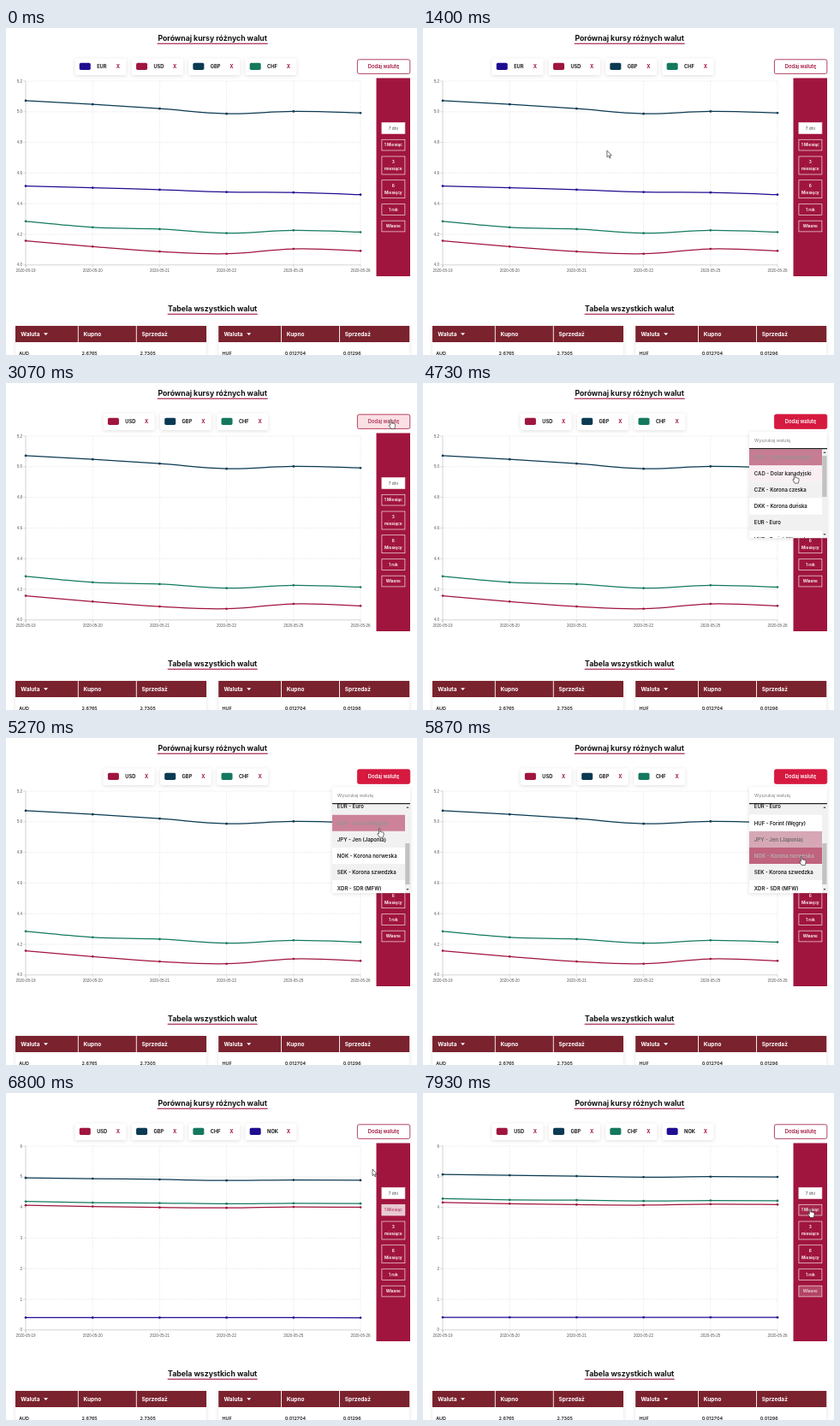
These frames come from a looping animation (480x382 px, 8000 ms). An HTML page:

```html
<!DOCTYPE html>
<html lang="pl">
<head>
<meta charset="utf-8">
<title>Kursy walut</title>
<style>
  html, body { margin: 0; width: 100%; height: 100%; overflow: hidden; background: #fff; }
  svg { display: block; width: 100vw; height: 100vh; }
  text { font-family: Inter, "Open Sans", sans-serif; white-space: pre; }
  .axis text { font-family: "Liberation Sans", Arial, sans-serif; }
  .raised { filter: drop-shadow(0 1px 2px rgba(0, 0, 0, .13)); }
</style>
</head>
<body>
<svg id="stage" viewBox="0 0 480 382">
  <defs><clipPath id="listClip"><rect x="381" y="77" width="91" height="104"/></clipPath></defs>
</svg>
<script>
const LOOP = 8000, FADE = 300;
const REMOVED = 2130, OPENED = 3430, ADDED = 6185;
const RED = '#a0153e', INK = '#1c1c1c', HEAD = '#7a222e';
const stage = document.getElementById('stage');

// Drawing helpers
function el(parent, tag, attrs = {}) {
  const node = document.createElementNS('http://www.w3.org/2000/svg', tag);
  set(node, attrs);
  return parent.appendChild(node);
}
function set(node, attrs) {
  for (const key in attrs) node.setAttribute(key, attrs[key]);
}
const group = (parent, attrs) => el(parent, 'g', attrs);
const rect = (parent, x, y, width, height, fill, more) =>
  el(parent, 'rect', { x, y, width, height, fill, ...more });
const line = (parent, x1, y1, x2, y2, stroke, more) =>
  el(parent, 'line', { x1, y1, x2, y2, stroke, 'stroke-width': .6, ...more });
function label(parent, x, y, str, size, weight, fill, anchor = 'start') {
  const node = el(parent, 'text', { x, y, fill, 'font-size': size, 'font-weight': weight, 'text-anchor': anchor });
  node.textContent = str;
  return node;
}

// Timing helpers
const clamp = v => Math.min(1, Math.max(0, v));
const smooth = u => u * u * (3 - 2 * u);
const mix = (from, to, a) => `color-mix(in srgb, ${to} ${(a * 100).toFixed(1)}%, ${from})`;
const isOpen = t => t >= OPENED && t < ADDED;
const scrollAt = t => 83 * smooth(clamp((t - 4850) / 350));

const path = [
  [400, 476, 386], [900, 405, 312], [1500, 200, 130], [1900, 130, 44], [2190, 130, 44],
  [2400, 284, 57], [2650, 300, 62], [2980, 445, 62], [3070, 449.5, 43], [4450, 449.5, 43],
  [4540, 440, 80], [4690, 435, 93.5], [4730, 434, 106.5], [5250, 436, 105], [5400, 438, 116],
  [5600, 441, 126], [5870, 442, 138], [6700, 443, 139], [6790, 428, 89], [6900, 428, 89],
  [7150, 452, 116], [7450, 452, 231], [7650, 453, 231], [7800, 453, 203], [7930, 452, 135]
];
function pointer(t) {
  const i = path.findIndex(p => p[0] > t);
  if (i === 0) return [path[0][1], path[0][2]];
  if (i < 0) return path[path.length - 1].slice(1);
  const [t0, x0, y0] = path[i - 1], [t1, x1, y1] = path[i];
  const u = smooth((t - t0) / (t1 - t0));
  return [x0 + (x1 - x0) * u, y0 + (y1 - y0) * u];
}
function inside(t, x, y, w, h) {
  const [px, py] = pointer(t);
  return px >= x && px < x + w && py >= y && py < y + h;
}
// Level of a linear hover transition at time t
function fade(t, active) {
  let a = 0;
  for (let s = Math.max(0, t - 2 * FADE); s < t; s += 10)
    a = clamp(a + (active(s) ? 10 : -10) / FADE);
  return a;
}

// Headings
function heading(y, str, width) {
  label(stage, 241.2, y, str, 8.7, 700, '#111', 'middle');
  rect(stage, 241.2 - width / 2, y + 2.4, width, 1.1, RED);
}
heading(15.3, 'Porównaj kursy różnych walut', 129);
heading(331.3, 'Tabela wszystkich walut', 105);

// Chart
const LEFT = 23, TOP = 62, BOTTOM = 276.8, STEP = 78.2, ROW = (BOTTOM - TOP) / 6;
const rates = {
  EUR: { color: '#1f0d91', data: [4.515, 4.504, 4.491, 4.476, 4.473, 4.459] },
  USD: { color: RED, data: [4.158, 4.12, 4.088, 4.073, 4.105, 4.092] },
  GBP: { color: '#0b3a53', data: [5.072, 5.048, 5.02, 4.987, 5.002, 4.992] },
  CHF: { color: '#14795f', data: [4.285, 4.246, 4.234, 4.208, 4.226, 4.214] },
  NOK: { color: '#1f0d91', data: [.412, .411, .411, .41, .41, .408] }
};
const axis = group(stage, { class: 'axis' });
const dates = [19, 20, 21, 22, 25, 26];
const dashed = { 'stroke-dasharray': '1.6 1.2' };
dates.forEach((day, i) => {
  const x = LEFT + STEP * i;
  if (i) line(axis, x, TOP, x, BOTTOM, '#dedede', dashed);
  line(axis, x, BOTTOM, x, BOTTOM + 3, '#c4c4c4');
  label(axis, x, 285.2, '2020-05-' + day, 4.5, 400, '#555', 'middle');
});
const tickLabels = [];
for (let i = 0; i <= 6; i++) {
  const y = BOTTOM - ROW * i;
  if (i) line(axis, LEFT, y, LEFT + STEP * 5, y, '#dedede', dashed);
  line(axis, LEFT - 3, y, LEFT, y, '#c4c4c4');
  tickLabels.push(label(axis, 19, y + 1.6, '', 4.5, 400, '#555', 'end'));
}
line(axis, LEFT, TOP, LEFT, BOTTOM + 3, '#b8b8b8');
line(axis, LEFT, BOTTOM, LEFT + STEP * 5, BOTTOM, '#b8b8b8');

const plot = group(stage);
for (const code in rates) {
  const r = rates[code];
  r.group = group(plot);
  r.curve = el(r.group, 'path', { fill: 'none', stroke: r.color, 'stroke-width': 1.25 });
  r.dots = r.data.map((_, i) => el(r.group, 'circle', { cx: LEFT + STEP * i, r: 1.35, fill: r.color }));
}
function drawCurve(r, base, top, grow) {
  const pts = r.data.map((v, i) => [LEFT + STEP * i, BOTTOM - (v - base) / (top - base) * (BOTTOM - TOP) * grow]);
  const handle = (i, sign) => {
    const a = pts[Math.max(0, i - 1)], b = pts[Math.min(pts.length - 1, i + 1)];
    return pts[i].map((v, k) => v + sign * .2 * (b[k] - a[k]));
  };
  let d = 'M' + pts[0];
  for (let i = 1; i < pts.length; i++) d += `C${handle(i - 1, 1)} ${handle(i, -1)} ${pts[i]}`;
  set(r.curve, { d });
  r.dots.forEach((dot, i) => set(dot, { cy: pts[i][1] }));
}

// Legend
const PITCH = 66.3, PILL = 60;
for (const code in rates) {
  const g = rates[code].pill = group(stage);
  rect(g, 0, 35.5, PILL, 19.5, '#fff', { rx: 2, class: 'raised' });
  rect(g, 5.2, 40.8, 13, 8.3, rates[code].color, { rx: 1.8 });
  label(g, 25.6, 47.1, code, 5.7, 700, INK);
  label(g, 48.2, 47.1, 'X', 5.8, 700, RED);
}
function codesAt(t) {
  if (t < REMOVED) return ['EUR', 'USD', 'GBP', 'CHF'];
  return t < ADDED ? ['USD', 'GBP', 'CHF'] : ['USD', 'GBP', 'CHF', 'NOK'];
}

// Sidebar
rect(stage, 432.5, 58.5, 39.5, 231.5, RED);
const periods = [
  [110.5, 13, '7 dni'], [130.3, 12.7, '1 Miesiąc'], [150, 21, '3', 'miesiące'],
  [177.7, 21, '6', 'Miesięcy'], [205.7, 12.7, '1 rok'], [225.2, 12.7, 'Własne']
].map(([y, h, ...lines], i) => {
  const box = rect(stage, 438.9, y, 27, h, '#fff', { stroke: '#f3dfe5', 'stroke-width': .7 });
  const first = y + h / 2 + 1.7 - (lines.length - 1) * 4;
  const texts = lines.map((s, k) => label(stage, 452.3, first + k * 8, s, 4.8, i ? 600 : 400, '#444', 'middle'));
  return { y, h, box, texts };
});

// Tables
function table(x, cells) {
  rect(stage, x, 348, 223, 50, '#fff', { class: 'raised' });
  rect(stage, x, 348, 223, 19, HEAD);
  const columns = [0, 73.3, 141.3];
  ['Waluta', 'Kupno', 'Sprzedaż'].forEach((name, i) => {
    if (i) line(stage, x + columns[i], 348, x + columns[i], 367, '#fff', { 'stroke-width': .9 });
    label(stage, x + columns[i] + 6.3, 360, name, 6.5, 700, '#fff');
    label(stage, x + columns[i] + 4.2, 382.3, cells[i], 5.4, 600, INK);
  });
  el(stage, 'path', { d: `M${x + 33} 356.2h5l-2.5 2.8z`, fill: '#fff' });
}
table(11, ['AUD', '2.6765', '2.7305']);
table(248.2, ['HUF', '0.012704', '0.01296']);

// Add button
const button = rect(stage, 410.4, 36.8, 61.4, 16.6, '#fff', { rx: 2, 'stroke-width': .8 });
const buttonText = label(stage, 441, 47.1, 'Dodaj walutę', 5.8, 600, RED, 'middle');

// Dropdown
const menu = group(stage);
rect(menu, 381, 57, 91, 124.2, '#fff', { class: 'raised' });
label(menu, 387, 68.8, 'Wyszukaj walutę', 5.3, 400, '#808080');
const ITEM = 19.1, LIST = 77.3;
const list = group(group(menu, { 'clip-path': 'url(#listClip)' }));
const items = [
  'AUD - Dolar australijski', 'CAD - Dolar kanadyjski', 'CZK - Korona czeska', 'DKK - Korona duńska',
  'EUR - Euro', 'HUF - Forint (Węgry)', 'JPY - Jen (Japonia)', 'NOK - Korona norweska',
  'SEK - Korona szwedzka', 'XDR - SDR (MFW)'
].map((name, i) => {
  const y = LIST + ITEM * i;
  return {
    y, plain: i % 2 ? '#ffffff' : '#f1f1f1',
    box: rect(list, 381, y, 85, ITEM, '#fff'),
    text: label(list, 386.8, y + 11.7, name, 6, 600, INK)
  };
});
rect(menu, 466, 77, 6, 104, '#f1f1f1');
const thumb = rect(menu, 466.3, 85, 5.2, 48, '#c1c1c1');
el(menu, 'path', { d: 'M467.3 82l1.7-2 1.7 2zM467.3 176l1.7 2 1.7-2z', fill: '#555' });
line(menu, 381, 76.6, 472, 76.6, '#222', { 'stroke-width': 1.1 });

// Pointer, both shapes with the hot spot at the origin
const outline = { fill: '#fff', stroke: '#222', 'stroke-width': .65, 'stroke-linejoin': 'round' };
const arrow = el(stage, 'path', { d: 'M0 0V7.6L1.8 6 3 8.8 4.2 8.3 3 5.6H5.4Z', ...outline });
const hand = el(stage, 'path', {
  d: 'M-.7 .6Q0-.4.8.6V4.2Q1.6 3.5 2.3 4.3 3.1 3.8 3.7 4.6 4.8 4.3 5 5.4V7.6L4.2 10.6H.2L-2.3 6.6Q-2 5.4-.7 6.4Z',
  ...outline
});

function render(t) {
  const open = isOpen(t), wide = t >= ADDED, codes = codesAt(t);

  const start = wide ? ADDED : REMOVED;
  const grow = t < REMOVED ? 1 : 1 - (1 - clamp((t - start) / 1000)) ** 4;
  tickLabels.forEach((node, i) => node.textContent = wide ? i : (4 + i * .2).toFixed(1));

  const left = 210 - ((codes.length - 1) * PITCH + PILL) / 2;
  for (const code in rates) {
    const r = rates[code], place = codes.indexOf(code);
    const display = place < 0 ? 'none' : 'inline';
    set(r.group, { display });
    set(r.pill, { display, transform: `translate(${left + Math.max(0, place) * PITCH})` });
    if (place >= 0) drawCurve(r, wide ? 0 : 4, wide ? 6 : 5.2, grow);
  }

  const hot = fade(t, s => isOpen(s) || inside(s, 410, 37, 62, 16.5));
  set(button, { fill: mix('#fff', '#d6193f', hot), stroke: mix(RED, '#d6193f', hot) });
  set(buttonText, { fill: mix(RED, '#fff', hot) });

  periods.forEach(({ y, h, box, texts }, i) => {
    const a = i ? fade(t, s => !isOpen(s) && inside(s, 438.5, y, 27.5, h)) : 1;
    set(box, { fill: mix(RED, '#fff', a) });
    if (i) texts.forEach(node => set(node, { fill: mix('#fff', RED, a) }));
  });

  set(menu, { display: open ? 'inline' : 'none' });
  if (open) {
    const scroll = scrollAt(t);
    set(list, { transform: `translate(0 ${-scroll})` });
    set(thumb, { y: 85 + scroll * 38 / 83 });
    for (const { y, plain, box, text } of items) {
      const a = fade(t, s => isOpen(s) && inside(s, 381, Math.max(LIST, y - scrollAt(s)), 85,
        ITEM + Math.min(0, y - scrollAt(s) - LIST)));
      set(box, { fill: mix(plain, RED, a) });
      set(text, { fill: mix(INK, '#fff', a) });
    }
  }

  const [x, y] = pointer(t);
  const clickable = inside(t, 410, 37, 62, 16.5)
    || (open ? inside(t, 381, 77, 85, 104) : periods.some(p => inside(t, 438.5, p.y, 27.5, p.h)))
    || codes.some((_, i) => inside(t, left + i * PITCH + 46, 39, 10, 12));
  const shown = t >= path[0][0];
  set(arrow, { display: shown && !clickable ? 'inline' : 'none', transform: `translate(${x} ${y})` });
  set(hand, { display: shown && clickable ? 'inline' : 'none', transform: `translate(${x} ${y})` });
}

function tick() {
  render(performance.now() % LOOP);
  requestAnimationFrame(tick);
}
tick();
</script>
</body>
</html>
```
